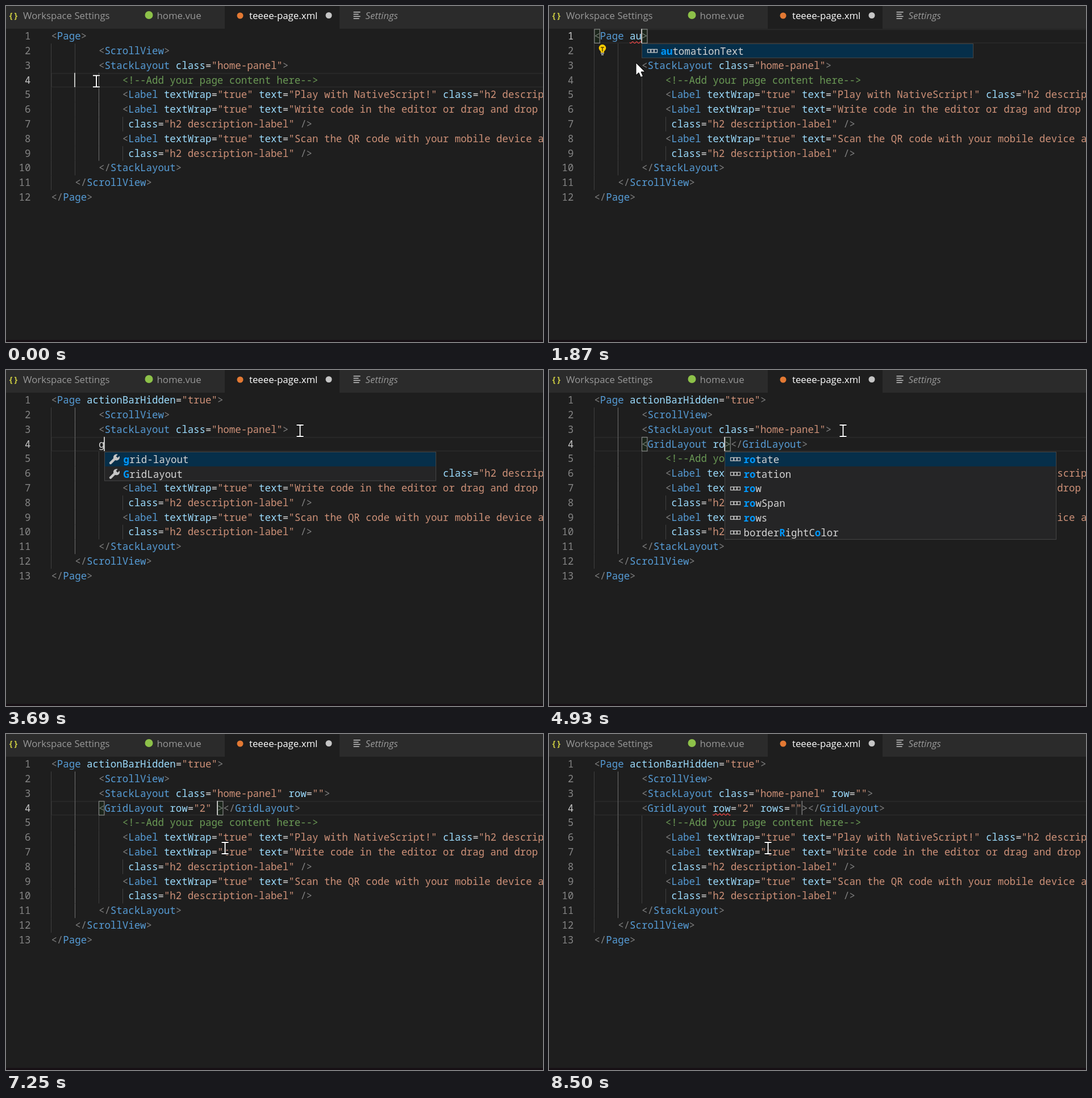
Recreate the animation shown at these times as an HTML page with a canvas. Size 945x592 px, loop 8.67 s.

```html
<!DOCTYPE html>
<html lang="en">
<head>
<meta charset="utf-8">
<title>Editor completion</title>
<style>
  html, body { margin: 0; width: 100%; height: 100%; overflow: hidden; background: #1e1e1e; }
  canvas { display: block; }
</style>
</head>
<body>
<canvas id="stage" width="945" height="592"></canvas>
<script>
const ctx = document.getElementById('stage').getContext('2d');
const W = 945, H = 592, LOOP = 8670;
const LEFT = 79.4, TOP = 40.3, CHAR = 10.447, LINE = 25.82, POPUP = 584;
const MONO = '17.41px "Noto Sans Mono", monospace';
const UI = '16.8px "Open Sans", sans-serif';
const COLOR = { punct: '#808080', tag: '#569cd6', attr: '#9cdcfe', string: '#ce9178',
                comment: '#6a9955', plain: '#d4d4d4', match: '#0097fb' };

const colX = col => LEFT + col * CHAR;
const rowY = row => TOP + row * LINE;
const pad = n => ' '.repeat(n);

// The bar character marks the caret; a null line does not exist yet.
const start = [
  '<Page>',
  pad(8) + '<ScrollView>',
  pad(8) + '<StackLayout class="home-panel">',
  null,
  pad(4) + '|' + pad(8) + '<!--Add your page content here-->',
  pad(12) + '<Label textWrap="true" text="Play with NativeScript!" class="h2 description-label" />',
  pad(12) + '<Label textWrap="true" text="Write code in the editor or drag and drop components"',
  pad(13) + 'class="h2 description-label" />',
  pad(12) + '<Label textWrap="true" text="Scan the QR code with your mobile device and go"',
  pad(13) + 'class="h2 description-label" />',
  pad(8) + '</StackLayout>',
  pad(4) + '</ScrollView>',
  '</Page>'
];

const page = rest => [0, '<Page' + rest + '>'];
const stack = rest => [2, pad(8) + '<StackLayout class="home-panel"' + rest];
const blank = text => [3, pad(8) + text + '|'];
const grid = rest => [3, pad(8) + '<GridLayout' + rest + '></GridLayout>'];
const popup = (query, items) => ({ query, items: items.split(' ') });

const pageProps = 'actionBarHidden automationText backgroundColor backgroundImage backgroundPosition ' +
  'backgroundRepeat backgroundSize bindingContext borderColor borderRadius borderWidth';
const aProps = popup('a', 'actionBarHidden automationText horizontalAlignment verticalAlignment');
const roProps = popup('ro', 'rotate rotation row rowSpan rows borderRightColor');
const layouts = query => popup(query, 'grid-layout GridLayout');
const snippet = true, bulb = true;

// time, edited line, extras
const steps = [
  [720, page('|')],
  [1130, page(' |')],
  [1290, page(' |'), { popup: popup('', pageProps) }],
  [1700, page(' a|'), { popup: aProps, bulb }],
  [1870, page(' au|'), { popup: popup('au', 'automationText'), bulb, squiggle: [6, 2] }],
  [2110, page(' a|'), { popup: aProps }],
  ...['', 't', 'tr', 'tru', 'true'].map((value, i) =>
    [i ? 2690 + 80 * i : 2280, page(` actionBarHidden="${value}|"`), { snippet }]),
  [3360, stack('>|')],
  [3520, blank('')],
  [3690, blank('g'), { popup: layouts('g') }],
  [3940, blank('gr'), { popup: layouts('gr') }],
  [4020, blank('gri'), { popup: layouts('gri') }],
  [4190, blank('grid'), { popup: layouts('grid') }],
  [4520, grid('|')],
  [4850, grid(' r|')],
  [4930, grid(' ro|'), { popup: roProps }],
  [5100, grid(' row|'), { popup: popup('row', 'row rowSpan rows') }],
  [5520, grid(' row="|"'), { snippet }],
  [5850, grid(' row="2|"'), { snippet }],
  [6180, grid(' row="2|"'), { snippet, bulb }],
  [6590, stack('|>')],
  [6670, stack(' r|>')],
  [6760, stack(' ro|>'), { popup: roProps }],
  [6920, stack(' row="|">'), { snippet }],
  [7090, grid(' row="2"|')],
  [7250, grid(' row="2" |')],
  [7920, grid(' row="2" r|')],
  [8000, grid(' row="2" ro|')],
  [8090, grid(' row="2" row|')],
  [8170, grid(' row="2" rows|'), { popup: popup('rows', 'rows rowSpan') }],
  [8340, grid(' row="2" rows="|"'), { snippet }],
  [8500, grid(' row="2" rows="|"'), { snippet, squiggle: [20, 3] }]
];

const mousePath = [
  [80, 159, 132.5], [450, 140, 62], [600, 134, 50], [850, 134, 50], [1050, 153, 100],
  [2280, 153, 100], [2770, 334, 99.5], [3190, 517.5, 107], [5520, 517.5, 107], [6000, 495, 98],
  [6510, 492, 106], [6920, 492, 106], [7080, 371, 132], [7250, 385.5, 201]
];

function stateAt(t) {
  let lines = [...start], extras = {};
  for (const [time, [row, text], more = {}] of steps) {
    if (time > t) break;
    lines = lines.map(line => line && line.replace('|', ''));
    lines[row] = text;
    extras = more;
  }
  lines = lines.filter(line => line !== null);
  const row = lines.findIndex(line => line.includes('|'));
  const col = lines[row].indexOf('|');
  lines[row] = lines[row].replace('|', '');
  return { lines, row, col, ...extras };
}

function mouseAt(t) {
  const next = mousePath.findIndex(key => key[0] > t);
  if (next === 0) return mousePath[0].slice(1);
  if (next < 0) return mousePath.at(-1).slice(1);
  const [t0, x0, y0] = mousePath[next - 1], [t1, x1, y1] = mousePath[next];
  const p = (t - t0) / (t1 - t0), ease = p * p * (3 - 2 * p);
  return [x0 + (x1 - x0) * ease, y0 + (y1 - y0) * ease];
}

function rect(x, y, w, h, color) {
  ctx.fillStyle = color;
  ctx.fillRect(x, y, w, h);
}

function label(text, x, y, color, font = MONO) {
  ctx.font = font;
  ctx.fillStyle = color;
  ctx.fillText(text, x, y);
}

function disc(x, y, r, color) {
  ctx.fillStyle = color;
  ctx.beginPath();
  ctx.arc(x, y, r, 0, 2 * Math.PI);
  ctx.fill();
}

function stroke(points, color, width) {
  ctx.strokeStyle = color;
  ctx.lineWidth = width;
  ctx.beginPath();
  points.forEach(([x, y]) => ctx.lineTo(x, y));
  ctx.stroke();
}

function outline(x, y, w, h, color, width = 1) {
  ctx.strokeStyle = color;
  ctx.lineWidth = width;
  ctx.strokeRect(x, y, w, h);
}

function drawCode(line, row) {
  const y = Math.round(rowY(row) + 18.8), markup = /[<=]/.test(line);
  let previous = '';
  for (const { 0: token, index } of line.matchAll(/<!--.*-->|"[^"]*"?|<\/?|\/?>|[\w-]+|=/g)) {
    const kind = token.startsWith('<!') ? 'comment'
      : token[0] === '"' ? 'string'
      : /[<>]/.test(token) ? 'punct'
      : token === '=' || !markup ? 'plain'
      : previous[0] === '<' ? 'tag' : 'attr';
    label(token, colX(index), y, COLOR[kind]);
    previous = token;
  }
}

function drawLines({ lines, row: current }) {
  const indent = line => line.search(/\S|$/);
  const active = indent(lines[current]) - 4;
  outline(LEFT + 0.7, rowY(current) + 1, W, LINE - 2, '#282828', 2);
  lines.forEach((line, row) => {
    for (let col = 0; col < indent(line); col += 4)
      rect(Math.round(colX(col)), rowY(row), 1, LINE, col === active ? '#707070' : '#404040');
    ctx.textAlign = 'right';
    label(row + 1, 43.5, Math.round(rowY(row) + 18.8), row === current ? '#c6c6c6' : '#858585');
    ctx.textAlign = 'left';
    drawCode(line, row);
  });
}

function drawCaret({ lines, row, col, snippet, squiggle, bulb }, t) {
  const line = lines[row], y = rowY(row);
  if (squiggle) {
    const [from, count] = squiggle, wave = [];
    for (let x = 0; x <= count * CHAR; x += 1)
      wave.push([colX(from) + x, y + 24 + 1.4 * Math.sin(x * 0.9)]);
    stroke(wave, '#ea4646', 1.3);
  }
  if (snippet) {
    const from = line.lastIndexOf('="', col) + 2;
    rect(colX(from), y, Math.max(2, (col - from) * CHAR), LINE - 1, 'rgba(124,124,124,.35)');
    rect(colX(col + 1) - 0.5, y, 1.5, LINE - 1, '#7c7c7c');
  } else {
    const close = [col, col - 1].find(c => line[c] === '>');
    if (close !== undefined)
      for (const c of [line.lastIndexOf('<', close), close]) {
        rect(colX(c), y, CHAR, LINE, 'rgba(0,100,0,.1)');
        outline(colX(c) + 0.5, y + 0.7, CHAR - 1, LINE - 1.4, '#888', 1.2);
      }
    if (t < 7500 || t >= 7920) rect(Math.round(colX(col)) - 1, y, 2, LINE - 0.6, '#c0c1bf');
  }
  if (bulb) drawBulb(94, rowY(row ? row - 1 : 1) + 8);
}

function drawBulb(x, y) {
  disc(x, y, 6.3, '#fc0');
  rect(x - 3, y + 4, 6, 4, '#fc0');
  rect(x - 3, y - 2, 6, 1.5, '#5a4800');
  rect(x - 0.8, y - 2, 1.6, 8, '#5a4800');
  rect(x - 3, y + 8.5, 6, 1.5, '#c5c5c5');
  rect(x - 2, y + 11, 4, 1.5, '#c5c5c5');
}

function drawPropertyIcon(x, y) {
  outline(x, y - 3, 17, 5.5, '#c5c5c5', 1.3);
  for (const dx of [5.7, 11.3]) stroke([[x + dx, y - 3], [x + dx, y + 2.5]], '#c5c5c5', 2);
}

function drawWrench(x, y, back) {
  ctx.lineCap = 'round';
  stroke([[x + 2, y + 7], [x + 11, y - 2]], '#c5c5c5', 4.5);
  ctx.lineCap = 'butt';
  disc(x + 12.5, y - 3, 5.6, '#c5c5c5');
  stroke([[x + 13, y - 3.5], [x + 19, y - 9.5]], back, 4);
}

function drawItem(item, query, x, y) {
  const lower = item.toLowerCase();
  let next = lower.startsWith(query) ? 0 : item.indexOf(query[0].toUpperCase()), used = 0;
  [...item].forEach((char, i) => {
    const hit = used < query.length && i >= next && lower[i] === query[used];
    if (hit) used++;
    label(char, x + i * CHAR, y, hit ? COLOR.match : COLOR.plain, (hit ? 'bold ' : '') + MONO);
  });
}

function drawPopup({ row, col, popup }) {
  if (!popup) return;
  const x = Math.round(Math.min(colX(col), W - POPUP)), y = Math.round(rowY(row + 1));
  const height = popup.items.length * LINE;
  rect(x, y, POPUP, height, '#252526');
  rect(x, y, POPUP, LINE, '#062f4a');
  outline(x + 0.5, y + 0.5, POPUP - 1, height - 1, '#454545');
  popup.items.forEach((item, i) => {
    const mid = y + (i + 0.5) * LINE;
    if (/^grid/i.test(item)) drawWrench(x + 9, mid, i ? '#252526' : '#062f4a');
    else drawPropertyIcon(x + 10.5, mid + 0.5);
    drawItem(item, popup.query, x + 33.5, Math.round(mid + 6.8));
  });
}

function drawMouse(t) {
  const [x, y] = mouseAt(t);
  if (t >= 1290 && t < 2280) {
    const arrow = new Path2D('M0 0V22L5 17.5L8.5 25.5L12.5 23.8L9 16H16Z');
    ctx.save();
    ctx.translate(x, y);
    ctx.fillStyle = '#fff';
    ctx.fill(arrow);
    ctx.strokeStyle = '#000';
    ctx.lineWidth = 1;
    ctx.stroke(arrow);
    ctx.restore();
    return;
  }
  for (const [color, width] of [['#000', 4], ['#fff', 2]]) {
    stroke([[x, y - 10], [x, y + 10]], color, width);
    for (const end of [-10, 10]) stroke([[x - 6, y + end], [x + 6, y + end]], color, width);
  }
}

function drawTabs() {
  rect(0, 0, W, 40, '#2b2b2b');
  rect(385, 0, 202, 40, '#1e1e1e');
  label('{}', 4, 22, '#cbcb41', 'bold 15px "Noto Sans Mono", monospace');
  label('Workspace Settings', 30, 23, '#989898', UI);
  disc(251.5, 16, 7, '#8dc149');
  label('home.vue', 265.5, 23, '#989898', UI);
  disc(412, 17, 5.5, '#e37933');
  label('teeee-page.xml', 428, 23, '#fff', UI);
  disc(568, 16.5, 5.5, '#c5c5c5');
  [12, 9, 12, 10].forEach((width, i) => rect(611.5, 10 + i * 3.8, width, 1.5, '#c5c5c5'));
  label('Settings', 632.5, 23, '#989898', 'italic ' + UI);
}

function draw(now) {
  const t = now % LOOP, state = stateAt(t);
  rect(0, 0, W, H, '#1e1e1e');
  drawLines(state);
  drawCaret(state, t);
  drawTabs();
  drawPopup(state);
  drawMouse(t);
  rect(0, 588.5, W, 4, '#160f14');
  requestAnimationFrame(draw);
}
requestAnimationFrame(draw);
</script>
</body>
</html>
```
